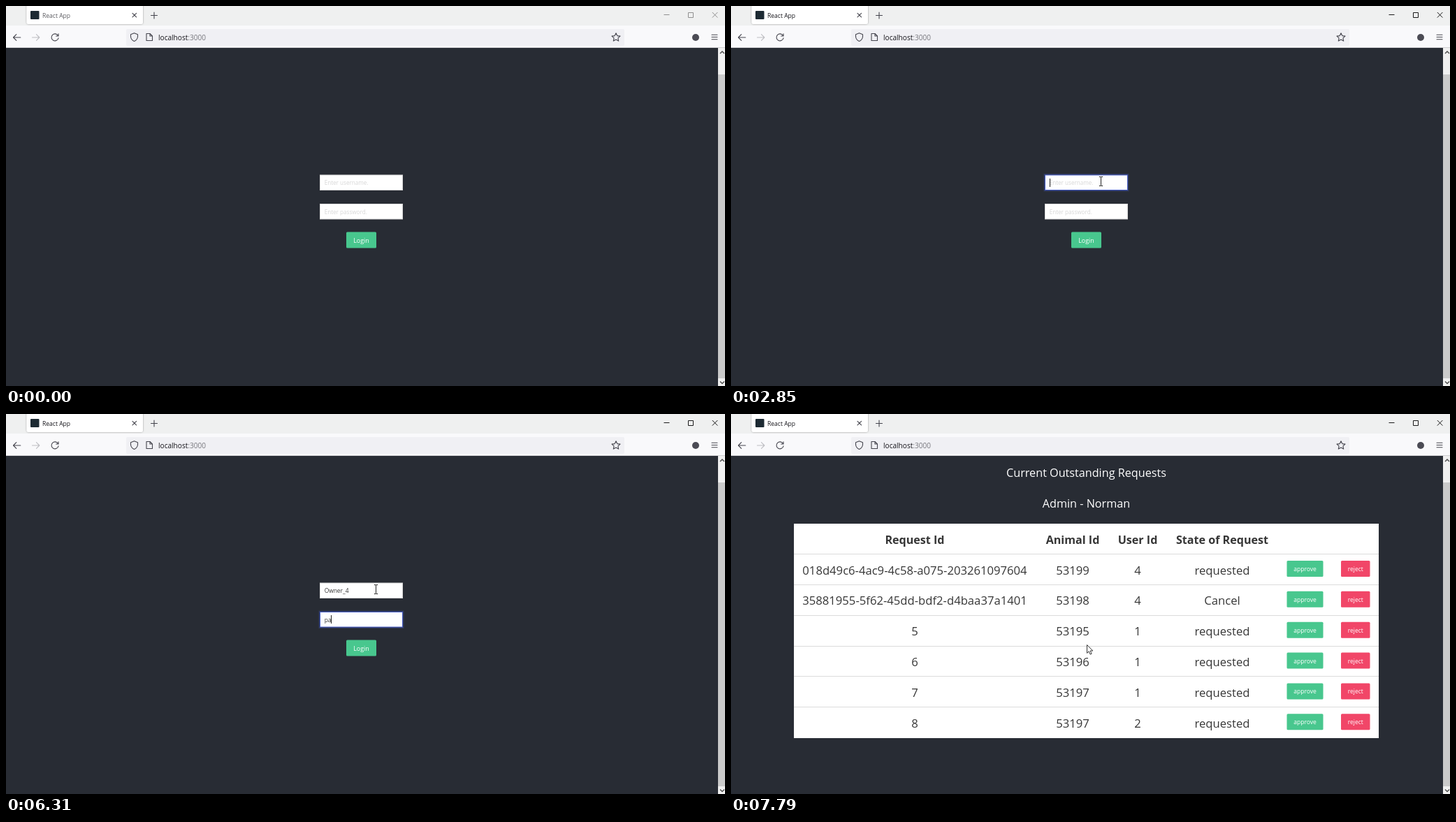
Animation of 1029 by 544 pixels, one loop 8 s. Source, as an HTML page:

```html
<!DOCTYPE html>
<html lang="en">
<head>
<meta charset="utf-8">
<title>Login</title>
<style>
  html, body { margin: 0; width: 100%; height: 100%; overflow: hidden; background: #282c34; }
  svg { display: block; width: 1029px; height: 544px; }
  text { font-family: "Open Sans", "Noto Sans", sans-serif; white-space: pre; }
  .icon { fill: none; stroke: #45454e; stroke-width: 1.1; stroke-linecap: round; stroke-linejoin: round; }
  .win { fill: none; stroke: #1a1a1a; }
  .tab-title { font-size: 8.55px; fill: #15141a; }
  .idle .win { stroke: #8f8f8f; }
  .idle .tab-title { fill: #5b5b60; }
  .input { fill: #fff; stroke: #dbdbdb; }
  .glow { fill: none; stroke: #485fc7; stroke-opacity: 0; stroke-width: 2; }
  .focus .input { stroke: #485fc7; }
  .focus .glow { stroke-opacity: .25; }
  .value { font-size: 8.4px; fill: #363636; }
  .empty .value { font-size: 8.15px; fill: #d6d6d6; }
  .green { fill: #48c78e; }
  .green.hover { fill: #3abb81; }
  .red { fill: #f14668; }
  .label { font-size: 8.5px; fill: #fff; text-anchor: middle; }
  .heading { font-size: 16.2px; fill: #fff; text-anchor: middle; }
  .cell { font-size: 16.65px; fill: #363636; text-anchor: middle; }
  .head { font-size: 16.1px; font-weight: 700; }
</style>
</head>
<body>
<svg id="stage" viewBox="0 0 1029 544">
  <defs>
    <filter id="shade" x="-10%" y="-30%" width="120%" height="160%">
      <feDropShadow dx="0" dy="0" stdDeviation="1.3" flood-opacity=".4"/>
    </filter>
  </defs>

  <rect width="1029" height="28" fill="#eff0f0"/>
  <rect y="28" width="1029" height="32" fill="#f9f9fb"/>
  <rect x="29.5" y="-6" width="166.5" height="32" rx="3" fill="#fff" filter="url(#shade)"/>
  <rect x="35" y="7" width="12.5" height="12" rx="1" fill="#1d2a33"/>
  <text class="tab-title" x="52" y="16.5">React App</text>
  <path class="icon" d="M181 10.300l5.600 5.600m0-5.600l-5.600 5.600M207.500 13.500h9m-4.500-4.500v9"/>
  <path class="win" d="M941.500 12.500h8M976.500 9.500h7v7h-7zM1010.800 9l7.600 7.600m0-7.600l-7.600 7.600"/>

  <rect x="172" y="33" width="713" height="24" rx="2" fill="#f0f0f4"/>
  <path class="icon" d="M20.800 45H10.500m4.300-4.300L10.500 45l4.300 4.300"/>
  <path class="icon" style="stroke:#bdbdc2" d="M37.500 45h10.300m-4.300-4.300l4.300 4.300l-4.300 4.300"/>
  <path class="icon" d="M74.500 42.500A5 5 0 1 0 75 45.800M75 39.800v3.200h-3.300"/>
  <path class="icon" d="M183.500 38.800l5 1.900v3.300q-.4 4.300-5 6.500q-4.600-2.200-5-6.500v-3.300z"/>
  <path class="icon" d="M201 39.500h5l3.500 3.500v6.500h-8.500zM206 39.500v3.500h3.500"/>
  <path class="icon" id="star"/>
  <circle cx="987" cy="45" r="5" fill="#4b4b54"/>
  <path class="icon" d="M1010 41.300h8m-8 3.200h8m-8 3.200h8"/>
  <text x="218" y="49" font-size="10.1" fill="#15141a">localhost<tspan fill="#77777d">:3000</tspan></text>

  <rect y="59" width="1029" height="1" fill="#cfcfd2"/>
  <rect y="60" width="1019" height="484" fill="#282c34"/>
  <rect x="1019" y="60" width="10" height="484" fill="#f0f0f0"/>
  <rect x="1019" y="98" width="10" height="435" fill="#cacaca"/>
  <path d="M1022 68l3-3l3 3M1022 537.500l3 3l3-3" fill="none" stroke="#505050" stroke-width="1.5"/>

  <g id="login">
    <g id="user"></g>
    <g id="pass"></g>
    <rect class="green" id="button" x="487" y="323.500" width="43" height="23" rx="1.500"/>
    <text class="label" x="508.500" y="338.500" style="font-size:8.900px">Login</text>
    <rect id="caret" width="1" height="12" fill="#222"/>
  </g>
  <g id="requests"></g>

  <path id="beam" fill="none" stroke="#222" d="M-2.500-6.500h2l.5.500l.5-.500h2M0-6v12M-2.500 6.500h2l.5-.500l.5.500h2"/>
  <path id="arrow" fill="#fff" stroke="#222" stroke-width=".9" stroke-linejoin="round"
        d="M.5.500v11.800l2.700-2.500l1.900 4.300l2-.900l-1.900-4.200h3.600z"/>
</svg>
<script>
const $ = id => document.getElementById(id);
const LOOP = 8000;
const USER = "Owner_4", PASS = "pa";

const text = (cls, x, y, s) => `<text class="${cls}" x="${x}" y="${y}">${s}</text>`;
const show = (el, on) => el.setAttribute("visibility", on ? "visible" : "hidden");
const latest = (list, t) => list.filter(v => v <= t).pop() ?? -1;

function starPath(cx, cy, r) {
  const points = Array.from({ length: 10 }, (_, i) => {
    const a = i * Math.PI / 5, d = i % 2 ? r * .48 : r;
    return (cx + d * Math.sin(a)).toFixed(1) + " " + (cy - d * Math.cos(a)).toFixed(1);
  });
  return "M" + points.join("L") + "Z";
}
$("star").setAttribute("d", starPath(873, 45, 6.3));

function makeField(id, top, hint) {
  const g = $(id);
  g.innerHTML = `<rect class="glow" x="448.500" y="${top - .5}" width="120" height="23.500"/>
    <rect class="input" x="449.500" y="${top + .5}" width="118" height="21.500"/>` +
    text("value", 455.7, top + 14.8, "");
  const value = g.querySelector("text");
  return {
    top, value,
    set(s, focus) {
      const shown = s || hint;
      if (value.textContent !== shown) value.textContent = shown;
      g.setAttribute("class", (s ? "" : "empty ") + (focus ? "focus" : ""));
    },
    caretX: s => Math.round(456 + (s ? value.getComputedTextLength() - .7 : 0)),
    holds: (x, y) => x > 449 && x < 568 && y > top && y < top + 23
  };
}
const user = makeField("user", 241.5, "Enter username.");
const pass = makeField("pass", 283, "Enter password.");

function buildRequests() {
  const columns = [263, 489, 582, 703];
  const rows = [
    ["018d49c6-4ac9-4c58-a075-203261097604", 53199, 4, "requested"],
    ["35881955-5f62-45dd-bdf2-d4baa37a1401", 53198, 4, "Cancel"],
    [5, 53195, 1, "requested"],
    [6, 53196, 1, "requested"],
    [7, 53197, 1, "requested"],
    [8, 53197, 2, "requested"]
  ];
  const line = (cells, cls, y) => cells.map((c, i) => text(cls, columns[i], y, c)).join("");
  const button = (cls, x, y, w, s) =>
    `<rect class="${cls}" x="${x}" y="${y}" width="${w}" height="23" rx="1.500"/>` +
    text("label", x + w / 2, y + 15, s);

  let out = text("heading", 508.5, 90, "Current Outstanding Requests") +
    text("heading", 508.5, 133.5, "Admin - Norman") +
    `<rect x="90" y="157" width="837" height="307" fill="#fff"/>` +
    line(["Request Id", "Animal Id", "User Id", "State of Request"], "cell head", 186);
  rows.forEach((row, i) => {
    const y = i * 43.85;
    out += `<rect x="90" y="${Math.round(200 + y)}" width="837" height="1" fill="#dbdbdb"/>` +
      line(row, "cell", 229.5 + y) +
      button("green", 795.5, 210 + y, 52, "approve") +
      button("red", 873, 210 + y, 41.5, "reject");
  });
  $("requests").innerHTML = out;
}
buildRequests();

const userKeys = [3180, 3450, 3530, 3600, 3680, 4240, 4480];
const passKeys = [5570, 5690];
const FOCUS = 740, TAB = 4740, BLUR = 6960, SUBMIT = 7030;
// Typing forces the caret on; the blink timer keeps its own phase.
const blinkOff = [1250, 2340, 3380, 3940, 4450, 5270, 5800, 6840];
const caretOn = [FOCUS, 1780, 2850, TAB, 6310, ...userKeys, ...passKeys].sort((a, b) => a - b);

// start, end, from, to
const moves = [
  [330, 720, [985, 551], [529, 251]],
  [6450, 6900, [529, 251], [514, 337]],
  [7570, 7790, [514, 337], [509, 330]]
];

function pointer(t) {
  const [a, b, from, to] = moves.filter(m => m[0] <= t).pop() || moves[0];
  const p = Math.min(1, Math.max(0, (t - a) / (b - a)));
  const e = a < 1000 ? 1 - (1 - p) ** 2 : p * p * (3 - 2 * p);
  return from.map((v, i) => v + (to[i] - v) * e);
}

function render(t) {
  const typed = (s, keys) => s.slice(0, keys.filter(k => k <= t).length);
  const done = t >= SUBMIT;
  const inUser = t >= FOCUS && t < TAB;
  const inPass = t >= TAB && t < BLUR;
  const name = typed(USER, userKeys), word = typed(PASS, passKeys);

  $("stage").setAttribute("class", t < FOCUS ? "idle" : "");
  $("login").style.display = done ? "none" : "";
  $("requests").style.display = done ? "" : "none";
  user.set(name, inUser);
  pass.set(word, inPass);

  const lit = latest(caretOn, t) > latest(blinkOff, t);
  show($("caret"), (inUser || inPass) && lit && !done);
  if (!done) {
    const field = inPass ? pass : user;
    $("caret").setAttribute("x", field.caretX(inPass ? word : name));
    $("caret").setAttribute("y", Math.floor(field.top) + (inPass ? 5 : 6));
  }

  const [x, y] = pointer(t).map(Math.round);
  const over = !done && (user.holds(x, y) || pass.holds(x, y));
  const hover = x > 487 && x < 530 && y > 323 && y < 347;
  $("button").setAttribute("class", hover ? "green hover" : "green");
  show($("beam"), t >= 350 && over);
  show($("arrow"), t >= 350 && !over);
  $("beam").setAttribute("transform", `translate(${x + .5} ${y})`);
  $("arrow").setAttribute("transform", `translate(${x} ${y})`);
}

const start = performance.now();
function tick() {
  render((performance.now() - start) % LOOP);
  requestAnimationFrame(tick);
}
tick();
</script>
</body>
</html>
```
